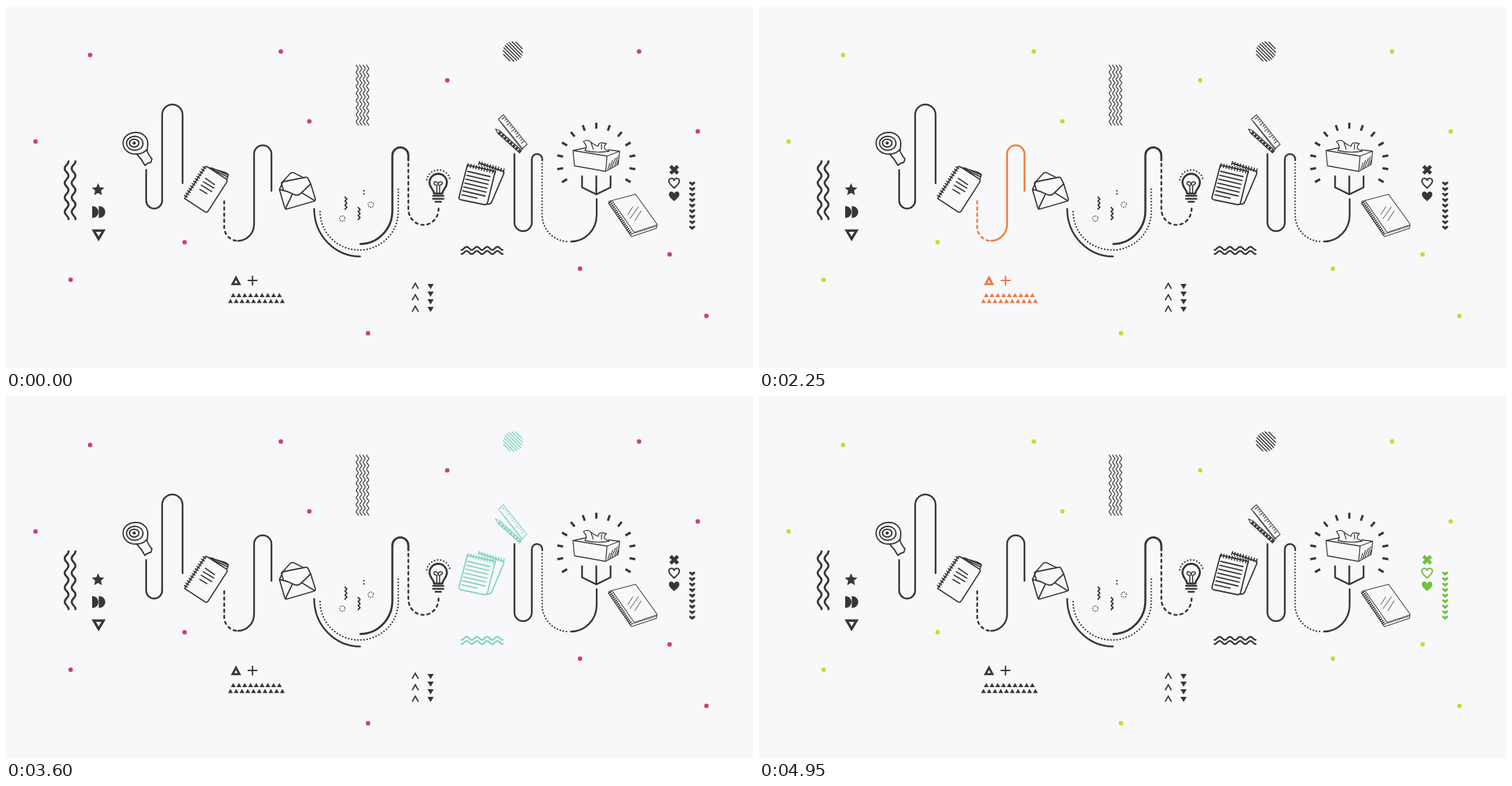
These frames come from a looping animation (1075x521 px, 5.4 s). An HTML page:

```html
<!DOCTYPE html>
<html lang="en">
<head>
<meta charset="utf-8">
<title>Stationery</title>
<style>
  html, body { margin: 0; width: 100%; height: 100%; overflow: hidden; background: #f8f8fb; }
  svg { display: block; width: 1075px; height: 521px; color: #37373a; fill: none; stroke: currentColor;
        stroke-width: 2; stroke-linecap: round; stroke-linejoin: round; }
  .solid { fill: currentColor; stroke: none; }
  .page { fill: #f8f8fb; }
  .line { stroke-width: 2.5; }
  .thin { stroke-width: 1.1; }
  .dash { stroke-width: 2.6; stroke-dasharray: 3.5 5.3; }
  .dots { stroke-width: 2.3; stroke-dasharray: .1 4.4; }
  .sharp { stroke-linejoin: miter; stroke-linecap: butt; }
  .coil { stroke-width: 6; stroke-dasharray: 1.7 2.4; stroke-linecap: butt; }
</style>
</head>
<body>
<svg viewBox="0 0 1075 521">
  <g id="specks" class="solid"></g>

  <g id="left" data-step="1" data-color="#f39a2d">
    <path class="solid" d="M124 288c12 0 12 17 0 17zM133.500 288c12.500 0 12.500 17 0 17z"/>
    <path class="sharp" stroke-width="3.600" d="M126.300 323.300h14l-7 11.800z"/>
  </g>

  <g data-step="2" data-color="#b01c1e">
    <path stroke-width="1.900" d="M188 213C177 214 169 207 168.500 198C168 188 177 182 187 182C197 182 204 189 204 198C204 203 203 206 203 209Q206 216 210 220L208.500 225Q203 226 200 229.500Q195 220 188 213Q198 213 203 206"/>
    <path stroke-width="1.900" d="M197 198C197 191 191 187.500 185 187.500C178 188 173 193 173.500 198C174 204 180 208 186 207.500C192 207 197 204 197 198z"/>
    <ellipse cx="184.500" cy="197.300" rx="6.800" ry="5.600"/>
    <circle class="solid" cx="184.500" cy="197.300" r="2.300"/>
  </g>

  <g data-step="3" data-color="#8f4fa8">
    <path class="line" d="M201.700 236V280a11.500 11.500 0 0 0 23 0V156.500a14.700 14.700 0 0 1 29.400 0V255"/>
  </g>

  <g data-step="4" data-color="#202c90">
    <path stroke-width="1.700" d="M289 231L317 249Q319 251 318 253L291 295Q289 298 286 296L257 277L287 231L314 239Q319 241 320 243L318 249M292 233L319 246M296 233L319 243"/>
    <path stroke-width="1.700" d="M287 248L300 257M284 253L299 262M281 258L296 267M279 264L289 270"/>
    <path class="coil" d="M286 232L258 275"/>
  </g>

  <g id="triangles" data-step="5" data-color="#f0793a">
    <path class="dash" d="M314 281V318a20 20 0 0 0 19 20"/>
    <path class="line" d="M334 338a23 24 0 0 0 23-24V213a12.500 12.500 0 0 1 25 0V266"/>
    <path class="sharp" stroke-width="3" d="M331 391l5 9.300h-10z"/>
    <path d="M348.500 395h12.500M354.700 389v12.500"/>
  </g>

  <g data-step="6" data-color="#ee5a5a">
    <path stroke-width="1.800" d="M393.500 264L401 290Q402 293 405 292L443 281Q446 280 445 277L438.500 256L424 270Q419 274 414 271Q404 266 393.500 264L399 252L409 241Q411 239 414 240L428 247M399 264L396.500 256Q396 253.500 398.500 253L431 246.500Q434 246 435 249L438.500 256M402 292L412 271M444 280L426 269"/>
  </g>

  <g id="bend" data-step="7" data-color="#35a9d8">
    <path class="line" d="M443.500 292A66 68.500 0 0 0 509.500 360.500"/>
    <path class="dots" d="M452 296a56 55 0 0 0 112.500 0V263"/>
    <path stroke-width="3" d="M510 342.500a46.500 48 0 0 0 46-48V215a11.500 11.500 0 0 1 23 0V222"/>
    <path class="dash" d="M579 227V292a21.700 23 0 0 0 43.500 0V289"/>
    <path class="dots" stroke-width="1.500" d="M515 266v9"/>
    <g stroke-width="1.600" stroke-dasharray=".1 3"><circle cx="484" cy="306" r="3.900"/><circle cx="525" cy="286" r="3.900"/></g>
    <path stroke-width="2.800" d="M616 270C616 264 609.500 262 609.500 254a12.500 12.500 0 0 1 25 0C634.500 262 628 264 628 270z"/>
    <path stroke-width="1.600" d="M620 269V258q-4 0-4-3t3-2t3 5q0-5 3-5t3 2t-4 3V269"/>
    <path stroke-width="2.600" d="M614.500 273.300h15M614.500 277.500h15M618 281.700h8"/>
    <path class="dots" d="M605.500 250a17 17 0 0 1 33.500 0"/>
  </g>

  <g id="pads" data-step="8" data-color="#86d3c1">
    <g stroke-width="1.900">
      <path d="M681 226L716 238Q717 240 716 242L699 282Q697 286 692 285"/>
      <path class="coil" d="M680 226L717 237"/>
      <path class="page" d="M664 229L704 238L693 283Q692 286 689 286L655 279Q651 278 652 275z"/>
      <path class="coil" d="M664 229L705 239"/>
    </g>
    <path class="thin page" d="M708.500 163L716 156.500L750 199L742 206z"/>
    <path class="thin" d="M711.500 166L744 206"/>
    <path stroke-width="1.200" d="M704.500 177L710.500 179.500L742 208L739 211.500L707.500 183z"/>
    <path class="sharp" stroke-width="3.500" stroke-dasharray="4 1.500" d="M709 181.500L740 209.500"/>
  </g>

  <g id="box" data-step="9" data-color="#ec468f">
    <path class="line" d="M731.700 213V311.500a12.500 12.500 0 0 0 25 0V220.500a7.500 7.500 0 0 1 15 0V222"/>
    <path class="dots" d="M771.500 227V300a38 38.500 0 0 0 37 39"/>
    <path class="line" d="M813 339a37 38 0 0 0 37-38V278"/>
    <path class="sharp line" d="M829 244V261L849.500 271L870 261V244M849.500 244V271"/>
    <path stroke-width="1.300" d="M816 208L865 216L863 238L818 230zM865 216L883 209L881 228L863 238M816 208L835 204M867 207L883 209"/>
    <path stroke-width="1.300" d="M833 208Q838 203 831 195Q838 191 843 197Q847 200 852 202Q853 196 858 197L864 198Q859 203 862 206L868 209Q849 212 833 208M842 197L845 206M857 199L857 206"/>
    <path class="thin" d="M866 235L869 226M869 234L873 222M872 232L877 219M876 230L880 217M879 228L881 222"/>
  </g>

  <g data-step="10" data-color="#7d5bc0">
    <path class="thin" d="M868 281L906 271L937 314L936 320L900 332L867 284zM872 280L904 326L937 315"/>
    <path class="sharp" stroke-width="4.500" stroke-dasharray="1.700 1.200" d="M869 282L900 329"/>
    <path class="sharp thin" stroke-dasharray="2 1" d="M901 328L936 317"/>
    <path stroke-width=".9" d="M895 300L902 289M898 306L910 289M905 309L914 295"/>
  </g>

  <g id="hearts" data-step="11" data-color="#72c03c">
    <path class="sharp" stroke-width="5" d="M956.300 230.500l10.500 10.500M966.800 230.500l-10.500 10.500"/>
  </g>
</svg>
<script>
  const STEP = 450, STEPS = 12;
  const el = id => document.getElementById(id);
  const add = (id, markup) => el(id).insertAdjacentHTML('beforeend', markup);
  const times = (n, f) => Array.from({ length: n }, (_, i) => f(i)).join('');
  const path = (d, attrs = '') => `<path d="${d}" ${attrs}/>`;
  const solid = d => path(d, 'class="solid"');
  const segment = (x, y, dx, dy) => `M${x} ${y}l${dx} ${dy}`;
  const triangle = (x, y, w, h) => solid(`M${x - w / 2} ${y}h${w}l${-w / 2} ${h}z`);

  // Vertical wave running from one extreme to the next, n half periods of height h
  const wave = (x, y, n, h, w) => `M${x} ${y}` + times(n, i => {
    const dx = i % 2 ? -w : w;
    return `c0 ${h / 2} ${dx} ${h / 2} ${dx} ${h}`;
  });
  const heart = (x, y, attrs) => path(
    `M${x} ${y + 7}C${x - 4} ${y + 3} ${x - 7.5} ${y + 1} ${x - 7.5} ${y - 3}` +
    `C${x - 7.5} ${y - 8} ${x - 1.5} ${y - 8} ${x} ${y - 4}` +
    `C${x + 1.5} ${y - 8} ${x + 7.5} ${y - 8} ${x + 7.5} ${y - 3}` +
    `C${x + 7.5} ${y + 1} ${x + 4} ${y + 3} ${x} ${y + 7}z`, attrs);

  const specks = [[121, 70.5], [395.5, 65.5], [635, 107], [911, 65.5], [436.5, 166], [42.5, 195], [995.5, 180.5],
    [257, 340], [93, 394], [521, 471], [826, 378], [955, 357.5], [1008, 446]];
  add('specks', specks.map(([x, y]) => `<circle cx="${x}" cy="${y}" r="3.2"/>`).join(''));

  const star = times(10, i => {
    const r = i % 2 ? 4.4 : 9.6, a = i * Math.PI / 5;
    return `${132.5 + r * Math.sin(a)},${264.5 - r * Math.cos(a)} `;
  });
  add('left', `<polygon class="solid" points="${star}"/>` +
    path(wave(90, 223.5, 8, 10.4, -5.5) + wave(100, 223.5, 8, 10.4, -5.5), 'stroke-width="3"'));

  add('triangles', times(9, i => triangle(327 + 8.3 * i, 419, 7, -6)) +
    times(10, i => triangle(323 + 8.3 * i, 427.5, 7, -6)));

  add('bend', path(times(4, i => wave(504 + 5 * i, 85, 17, 5.1, 3)), 'stroke-width="1.3"') +
    path(wave(488, 275, 6, 2.9, 2.4) + wave(507, 290, 6, 2.9, 2.4)) +
    path(times(3, i => `M584.5 ${407 + 16.5 * i}l4.5-8l4.5 8`), 'class="sharp" stroke-width="1.8"') +
    times(4, i => triangle(611, 400 + 11 * i, 9, 7.5)));

  add('pads', path(times(7, i => segment(664.5 - 1.4 * i, 238 + 5.6 * i, i > 5 ? 22 : 32, i > 5 ? 5 : 7.5)), 'stroke-width="1.8"') +
    path(times(13, i => segment(717.5 + 2.3 * i, 160 + 2.9 * i, i % 3 ? -1.8 : -3.5, i % 3 ? 1.4 : 2.7)), 'class="thin"') +
    path(wave(0, 0, 8, 7.4, 4.6) + wave(-6, 0, 8, 7.4, 4.6),
      'stroke-width="2.5" transform="translate(655.5 351) rotate(-90)"') +
    path(times(8, i => {
      const y = (i - 3.5) * 3.6, x = Math.sqrt(14.5 ** 2 - y * y);
      return `M${-x} ${y}H${x}`;
    }), 'class="sharp" stroke-width="1.5" transform="translate(729.5 65.5) rotate(45)"'));

  add('box', times(13, i => path('M0-48.500V-57',
    `class="sharp" stroke-width="3.2" transform="translate(849.5 225) rotate(${20 * (i - 6)})"`)));

  add('hearts', heart(961.5, 255, '') + heart(961.5, 274, 'class="solid"') +
    times(9, i => solid(`M983.3 ${253 + 7.95 * i}h2.5l1.7 1.5l1.7-1.5h2.5v2.200l-4.200 3.500l-4.200-3.500z`)));

  const groups = document.querySelectorAll('[data-step]');
  function draw() {
    const step = Math.floor(performance.now() / STEP) % STEPS;
    el('specks').style.color = step % 2 ? '#c7dc30' : '#cf3f74';
    for (const g of groups) g.style.color = step === +g.dataset.step ? g.dataset.color : '';
    requestAnimationFrame(draw);
  }
  draw();
</script>
</body>
</html>
```
